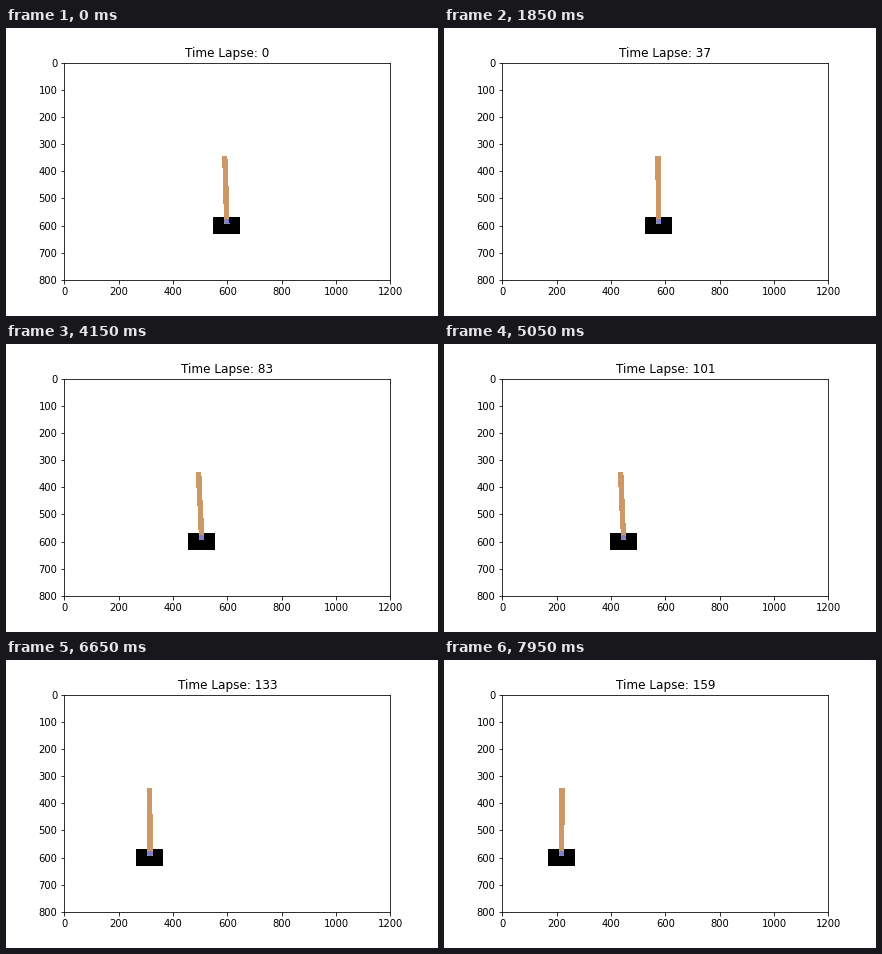
Write a matplotlib script that moves like this. It is 432 px wide and 288 px high and loops after 8000 ms.

```python
import numpy as np
import matplotlib.pyplot as plt
from matplotlib.animation import FuncAnimation

W, H = 1200, 800
STEPS, INTERVAL = 160, 50
CART_Y, AXLE_Y = 600, 585
CART_W, CART_H = 100, 60
POLE_W, POLE_LEN = 20, 250
POLE = (204, 153, 102)
AXLE = (127, 127, 204)

# Key poses, one every KEY_GAP steps
KEY_GAP = 20
CART_LEFT = [207.1, 203.3, 200.6, 196.7, 184.2, 166.9, 145.2, 122.7, 103.2]
LEAN = [-.03, 0, -.015, -.055, -.045, -.046, -.016, 0, .008]  # radians


def glide(keys, n):
    """Smooth cubic path through evenly spaced keys."""
    i, s = divmod(n / KEY_GAP, 1)
    i = int(i)
    a, b = keys[i:i + 2]
    ma, mb = np.gradient(keys)[i:i + 2]
    return ((1 + 2 * s) * (1 - s) ** 2 * a + s * (1 - s) ** 2 * ma
            + s * s * (3 - 2 * s) * b + s * s * (s - 1) * mb)


def render(n, left, scale):
    img = np.full((H, W, 3), 255, np.uint8)
    y, x = np.ogrid[0:H, 0:W]
    cx = (glide(CART_LEFT, n) - left) / scale + CART_W / 2
    lean = glide(LEAN, n)
    half = POLE_W / 2

    dx, up = x + .5 - cx, AXLE_Y - y - .5
    across = dx * np.cos(lean) - up * np.sin(lean)
    along = dx * np.sin(lean) + up * np.cos(lean)

    img[(abs(dx) <= CART_W / 2) & (abs(y + .5 - CART_Y) <= CART_H / 2)] = 0
    img[(abs(across) <= half) & (along >= -half)
        & (along <= POLE_LEN - half)] = POLE
    img[dx ** 2 + up ** 2 <= half ** 2] = AXLE
    return img


fig, ax = plt.subplots(figsize=(6, 4), dpi=72)
fig.subplots_adjust(left=.125, right=.9, bottom=.125, top=.88)
picture = ax.imshow(np.full((H, W, 3), 255, np.uint8),
                    interpolation="nearest", extent=(0, W, H, 0))
title = ax.set_title("Time Lapse: 0")
ax.apply_aspect()
box = ax.get_window_extent()


def update(n):
    picture.set_data(render(n, box.x0, box.width / W))
    title.set_text(f"Time Lapse: {n}")
    return picture, title


anim = FuncAnimation(fig, update, frames=STEPS, interval=INTERVAL,
                     repeat=True, repeat_delay=0, blit=False)
plt.show()
```
